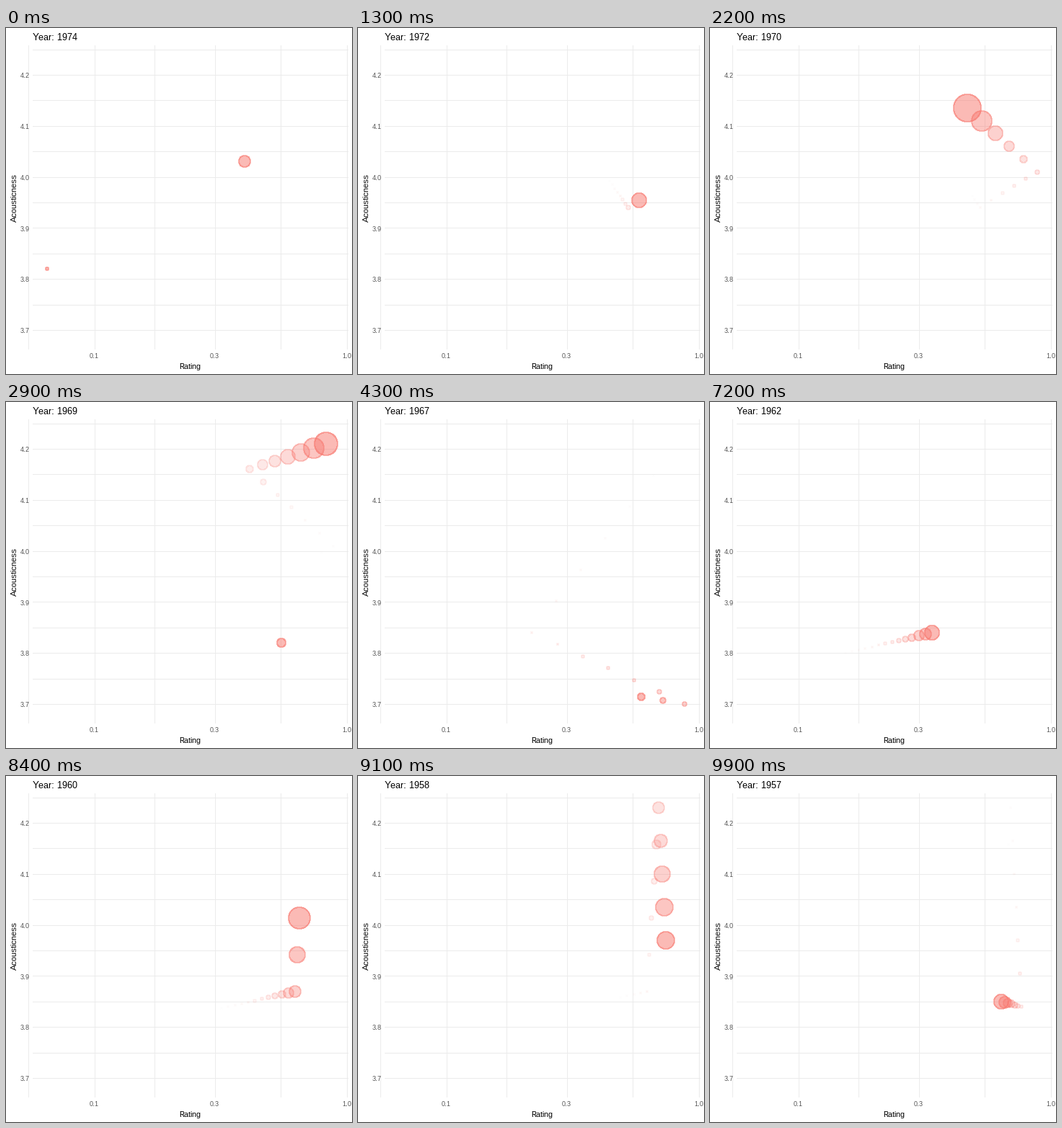
A matplotlib script that plays this animation: 480 by 480 pixels, repeating every 10000 ms.

```python
import numpy as np
import matplotlib.pyplot as plt
from matplotlib.animation import FuncAnimation
from matplotlib.colors import to_rgba
from matplotlib.patches import Circle

SIZE, DPI = 480, 72
FRAMES, STEP = 100, 100
FIRST, LAST = 1974, 1957
WAKE = 16
SALMON, GRID, GREY = "#F8766D", "#EBEBEB", "#4D4D4D"

# Key points of the bubble's path: year, x value, y value, point size
KEYS = [
    (1974, 0.393, 4.03, 7.6),
    (1972, 0.524, 3.94, 9),
    (1971, 0.885, 4.01, 8),
    (1970, 0.412, 4.16, 19),
    (1969, 0.829, 4.21, 15),
    (1968, 0.218, 3.84, 5),
    (1967, 0.880, 3.70, 4),
    (1965, 0.0995, 3.78, 5.6),
    (1964, 0.144, 3.797, 6.6),
    (1960, 0.624, 3.87, 11.3),
    (1959, 0.693, 4.23, 17.5),
    (1958, 0.765, 3.84, 8),
    (1957, 0.636, 3.85, 8.7),
]

# Bubbles that stand still: year, frames on stage, x value, y value, size
STILL = [(1974, 12, 0.065, 3.82, 2), (1969, 1, 0.55, 3.82, 5.6)]

plt.rcParams.update({
    "font.family": "Liberation Sans",
    "text.hinting": "native",
    "text.hinting_factor": 1,
})


def px(value):
    return 472.8 + 350 * np.log10(value)


def py(value):
    return 65 + 708 * (4.2 - value)


def frame_of(year):
    return round((FIRST - year) * (FRAMES - 1) / (FIRST - LAST))


fig = plt.figure(figsize=(SIZE / DPI, SIZE / DPI), dpi=DPI, facecolor="white")
ax = fig.add_axes([0, 0, 1, 1])
ax.set(xlim=(0, SIZE), ylim=(SIZE, 0))
ax.axis("off")


def label(x, y, text, size, color="black", **kw):
    return ax.text(x, y, text, fontsize=size, color=color, **kw)


def grid(xs, ys):
    ax.plot(xs, ys, color=GRID, lw=1, zorder=1)


for y in py(np.arange(3.7, 4.26, 0.05)):
    grid([37, 474], [y, y])
for value in (0.1, 0.3, 1.0):
    x = px(value)
    grid([x, x], [24, 445])
    label(x - 0.3, 458.5, f"{value}", 9, GREY, ha="center")
for a, b in ((0.03, 0.1), (0.1, 0.3), (0.3, 1.0)):
    x = px(np.sqrt(a * b))
    grid([x, x], [24, 445])
for value in np.arange(3.7, 4.21, 0.1):
    label(32.3, py(value) + 4.3, f"{value:.1f}", 9, GREY, ha="right")

label(255, 473, "Rating", 11, ha="center")
label(15.3, 235.5, "Acousticness", 11, rotation=90, rotation_mode="anchor",
      ha="center", va="baseline")
title = label(37, 17, "", 13)

bubbles = [Circle((0, 0), 1, lw=1, antialiased=False, zorder=3)
           for _ in range(WAKE + len(STILL))]
for bubble in bubbles:
    ax.add_patch(bubble)

years, xs, ys, sizes = np.array(KEYS).T
times = [frame_of(year) for year in years]
tracks = px(xs), py(ys), sizes


def state(i):
    return [np.interp(i, times, track) for track in tracks]


def visible(i):
    """Bubbles of one frame as (x, y, size, strength), oldest first."""
    shown = []
    late = max(0, WAKE + 2 - i)  # the wake builds up at the start
    for lag in range(min(i, WAKE - 1), 0, -1):
        fade = max(0, 1 - (lag + late) / WAKE) ** 3
        if fade:
            x, y, size = state(i - lag)
            shown.append((x, y, size * fade, fade))
    for year, stay, x, y, size in STILL:
        if 0 <= i - frame_of(year) < stay:
            shown.append((px(x), py(y), size, 1))
    return shown + [(*state(i), 1)]


def place(bubble, x, y, size, strength):
    bubble.center = round(x), round(y)
    bubble.set_radius(max(1, round(1.067 * size + 0.354)))
    color = to_rgba(SALMON, 0.5 * strength)
    bubble.set_facecolor(color)
    bubble.set_edgecolor(color)


def draw(i):
    title.set_text(f"Year: {round(FIRST + (LAST - FIRST) * i / (FRAMES - 1))}")
    shown = visible(i)
    for n, bubble in enumerate(bubbles):
        bubble.set_visible(n < len(shown))
    for bubble, spec in zip(bubbles, shown):
        place(bubble, *spec)
    return [title, *bubbles]


anim = FuncAnimation(fig, draw, frames=FRAMES, interval=STEP,
                     repeat=True, repeat_delay=0, blit=False)
plt.show()
```
